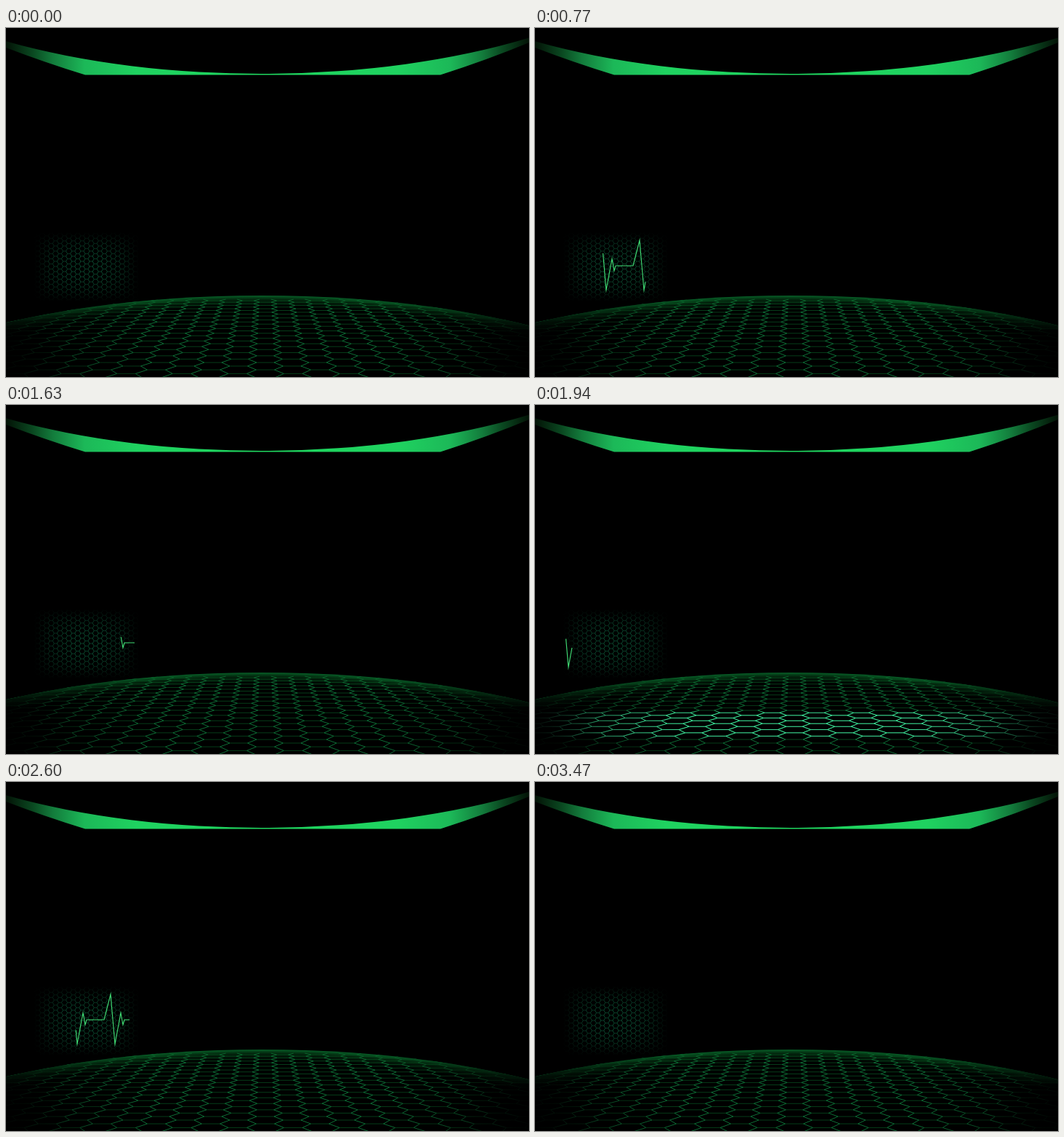
Write an HTML page with a canvas that moves like this. It is 720x480 px and loops after 3.5 s.

```html
<!DOCTYPE html>
<html lang="en">
<head>
<meta charset="utf-8">
<title>Pulse monitor</title>
<style>
  html, body { margin: 0; width: 100%; height: 100%; overflow: hidden; background: #000; }
  canvas { display: block; }
</style>
</head>
<body>
<canvas id="stage" width="720" height="480"></canvas>
<script>
const ctx = document.getElementById('stage').getContext('2d');
const LOOP = 3500, BEAT = 1735, SWEEP = BEAT / 2;

// Honeycomb of flat-topped cells; project maps (column, half row) to a point.
function honeycomb(project, columns, firstRow, lastRow) {
  const slants = new Path2D(), flats = new Path2D();
  const side = (k, i) => k + 0.5 + ((k + i) & 1 ? -1 : 1) / 6;
  const line = (path, a, b) => { path.moveTo(...a); path.lineTo(...b); };
  for (let k = -columns; k <= columns; k++) {
    for (let i = firstRow; i < lastRow; i++) {
      const p = project(side(k, i), i);
      line(slants, p, project(side(k, i + 1), i + 1));
      if ((k + i) & 1) line(flats, project(side(k - 1, i), i), p);
    }
  }
  return { slants, flats };
}

function strokeComb({ slants, flats }, slantStyle, flatStyle, width) {
  ctx.lineWidth = width;
  ctx.strokeStyle = slantStyle;
  ctx.stroke(slants);
  ctx.strokeStyle = flatStyle;
  ctx.stroke(flats);
}

function addStops(gradient, stops) {
  for (const [offset, color] of stops) gradient.addColorStop(offset, color);
  return gradient;
}

const floorY = row => 214 + 6300 / (24.6 + row);
const floorComb = honeycomb((c, r) => {
  const y = floorY((r - 1) / 2);
  return [357 + 37.5 * c * (y - 214) / 256, y];
}, 17, -3, 31);
const panelComb = honeycomb((c, r) => [111 + 6.1 * c, 328 + 3.52 * r], 12, -14, 14);

const DOME = { x: 352, y: 579, rx: 620, ry: 211 };
const dome = new Path2D();
dome.ellipse(DOME.x, DOME.y, DOME.rx, DOME.ry, 0, 0, Math.PI * 2);

// Drawn in the dome's unit circle.
const rim = addStops(ctx.createRadialGradient(0, 0, 0.93, 0, 0, 1), [
  [0, 'rgba(6,90,35,0)'], [0.6, 'rgba(6,85,30,.4)'], [1, 'rgba(8,100,42,.95)']
]);
const sideFade = addStops(ctx.createLinearGradient(0, 0, 720, 0), [
  [0, 'rgba(0,0,0,.85)'], [0.12, 'rgba(0,0,0,.4)'], [0.28, 'rgba(0,0,0,0)'],
  [0.72, 'rgba(0,0,0,0)'], [0.88, 'rgba(0,0,0,.4)'], [1, 'rgba(0,0,0,.85)']
]);
const cornerFade = addStops(ctx.createRadialGradient(357, 380, 280, 357, 380, 375), [
  [0, 'rgba(0,0,0,0)'], [1, 'rgba(0,0,0,.8)']
]);
const bandFill = addStops(ctx.createLinearGradient(0, 0, 720, 0), [
  [0, '#031206'], [0.05, '#0a4720'], [0.09, '#137c3c'], [0.15, '#1cb858'], [0.25, '#1fd260'],
  [0.5, '#1fd75f'], [0.75, '#1fd260'], [0.85, '#1cb858'], [0.91, '#137c3c'],
  [0.95, '#0a4720'], [1, '#031206']
]);
const band = new Path2D(
  'M0 18.3A620 253 0 0 0 720 13.6V20Q665 43 598 64.5H109Q52 47 0 27Z');

// Three identical beats followed by a short rest.
const trace = [[31, 327]];
for (const x of [31, 83, 135]) {
  for (const [dx, y] of [[9, 292], [15, 360.5], [23, 317.5], [26, 334], [28, 327], [52, 327]]) {
    trace.push([Math.min(x + dx, 177), y]);
  }
}
const traceLength = trace.slice(1).reduce(
  (sum, [x, y], n) => sum + Math.hypot(x - trace[n][0], y - trace[n][1]), 0);

function drawRim() {
  ctx.save();
  ctx.translate(DOME.x, DOME.y);
  ctx.scale(DOME.rx, DOME.ry);
  ctx.fillStyle = rim;
  ctx.fillRect(-1, -1, 2, 1);
  ctx.restore();
}

function drawFloor(t) {
  ctx.save();
  ctx.clip(dome);
  strokeComb(floorComb, '#10803f', '#08481e', 0.85);
  drawRim();

  const tail = -6.2 + 0.035 * (t % SWEEP);
  if (tail < 16) {
    const glow = addStops(ctx.createLinearGradient(0, floorY(tail + 5), 0, floorY(tail)), [
      [0, 'rgba(70,245,170,0)'], [0.1, 'rgba(70,245,170,.9)'],
      [0.9, 'rgba(70,245,170,.9)'], [1, 'rgba(70,245,170,0)']
    ]);
    strokeComb(floorComb, glow, glow, 1);
  }
  ctx.fillStyle = sideFade;
  ctx.fillRect(0, 360, 720, 120);
  ctx.fillStyle = cornerFade;
  ctx.fillRect(0, 415, 720, 65);
  ctx.restore();
}

function drawPanel() {
  ctx.save();
  ctx.beginPath();
  ctx.rect(39, 281, 144, 95);
  ctx.clip();
  strokeComb(panelComb, '#0f5c3c', '#0c4a30', 0.8);
  const fade = [[0, '#000'], [0.16, 'rgba(0,0,0,.35)'], [0.35, 'rgba(0,0,0,0)'],
    [0.65, 'rgba(0,0,0,0)'], [0.84, 'rgba(0,0,0,.35)'], [1, '#000']];
  for (const axis of [[39, 0, 183, 0], [0, 281, 0, 376]]) {
    ctx.fillStyle = addStops(ctx.createLinearGradient(...axis), fade);
    ctx.fillRect(39, 281, 144, 95);
  }
  ctx.restore();
}

function drawTrace(t) {
  const p = t % BEAT / BEAT;
  const tail = traceLength * p * (0.95 + 0.05 * p);
  const head = traceLength * Math.min(1, 2 * p - 0.01);
  if (head <= tail) return;
  ctx.save();
  ctx.beginPath();
  for (const point of trace) ctx.lineTo(...point);
  ctx.setLineDash([head - tail, 2000]);
  ctx.lineDashOffset = -tail;
  ctx.lineWidth = 1.15;
  ctx.strokeStyle = '#40dc74';
  ctx.stroke();
  ctx.restore();
}

function draw(now) {
  const t = now % LOOP;
  ctx.fillStyle = '#000';
  ctx.fillRect(0, 0, 720, 480);
  ctx.fillStyle = bandFill;
  ctx.fill(band);
  drawFloor(t);
  drawPanel();
  drawTrace(t);
}

const start = performance.now();
function tick() {
  draw(performance.now() - start);
  requestAnimationFrame(tick);
}
tick();
</script>
</body>
</html>
```
